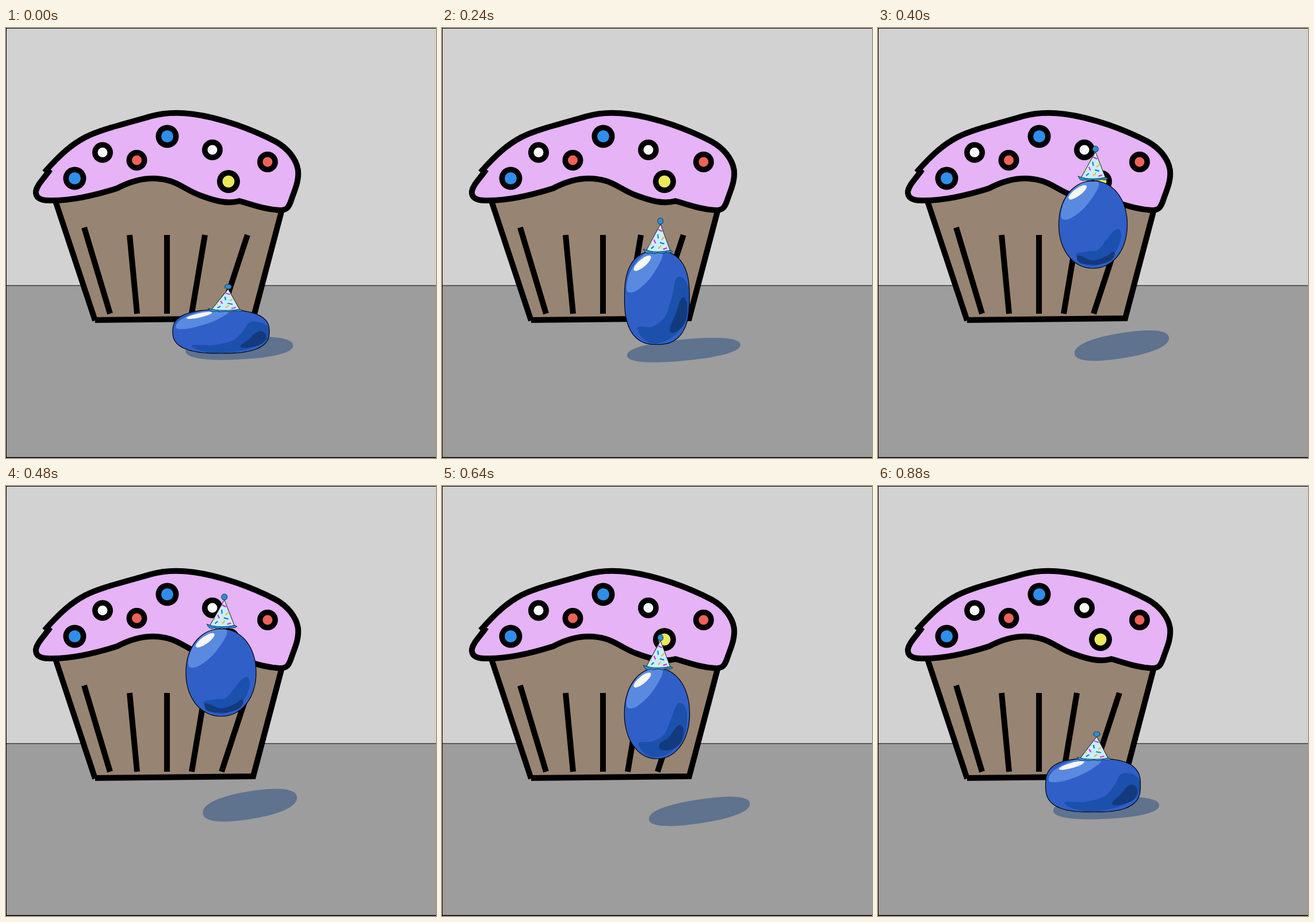
Animation of 748 by 748 pixels, one loop 960 ms. Source, as an HTML page with a canvas:

```html
<!DOCTYPE html>
<html>
<head>
<meta charset="utf-8">
<title>Bouncing blueberry</title>
<style>
  html, body { margin: 0; width: 100%; height: 100%; overflow: hidden; }
  canvas { display: block; }
</style>
</head>
<body>
<canvas id="stage" width="748" height="748"></canvas>
<script>
const ctx = document.getElementById('stage').getContext('2d');
const STEP = 80, STEPS = 12, CENTER = 374, GROUND = 567, FALL = 18;

// Key poses: size and base of the berry, squareness of its outline, hat position, shadow box
const key = (step, w, h, base, square, hatX, shX, shY, shW, shH) =>
  ({ step, w, h, base, square, hatX, shX, shY, shW, shH });
const keys = [
  key(0, 168, 76, 566, 2.6, 381.5, 406, 557, 187, 39),
  key(2, 130, 120, 567, 2.4, 378.5, 410, 564, 174, 43),
  key(4, 96, 205, 534, 2.7, 373, 431, 556.5, 220, 31),
  key(5, 119, 152, 418, 2.1, 374, 424, 552.5, 164, 44),
  key(7, 125, 152, 419, 2.1, 377, 424.5, 558, 163, 53),
  key(9, 102, 163, 566, 2.1, 374.5, 471, 574, 188, 30),
  key(11, 165, 93, 567, 2.8, 375.5, 397, 560, 184, 38)
];

const mix = (a, b, k) => a + (b - a) * k;

function poseAt(step) {
  const i = keys.findLastIndex(p => p.step <= step);
  const a = keys[i], b = keys[(i + 1) % keys.length];
  const k = (step - a.step) / ((b.step - a.step + STEPS) % STEPS), p = {};
  for (const name in a) p[name] = mix(a[name], b[name], k);
  // Free fall bends the path upwards between airborne keys
  if (a.base < 500) p.base -= FALL * 4 * k * (1 - k);
  p.lift = Math.max(0, GROUND - p.base);
  p.air = Math.min(1, (p.lift / 148) ** 2);
  return p;
}

// Superellipse whose right end rises by the given amount
function squircle(cx, cy, w, h, power, rise = 0) {
  const path = new Path2D(), bend = v => Math.sign(v) * Math.abs(v) ** (2 / power);
  for (let i = 0; i < 120; i++) {
    const a = i * Math.PI / 60, x = bend(Math.cos(a)), y = bend(Math.sin(a));
    path.lineTo(cx + x * w / 2, cy + y * h / 2 - x * rise / 2);
  }
  path.closePath();
  return path;
}

// Closed smooth curve through the points
function blob(points) {
  const n = points.length, path = new Path2D(), at = i => points[(i + n) % n];
  const tangent = i => {
    const dx = at(i + 1)[0] - at(i - 1)[0], dy = at(i + 1)[1] - at(i - 1)[1];
    const d = Math.hypot(dx, dy);
    return [dx / d, dy / d];
  };
  path.moveTo(...at(0));
  for (let i = 0; i < n; i++) {
    const [x, y] = at(i), [u, v] = at(i + 1), r = Math.hypot(u - x, v - y) / 3;
    const s = tangent(i), e = tangent(i + 1);
    path.bezierCurveTo(x + s[0] * r, y + s[1] * r, u - e[0] * r, v - e[1] * r, u, v);
  }
  return path;
}

function paint(path, fill, stroke, width) {
  if (fill) { ctx.fillStyle = fill; ctx.fill(path); }
  if (stroke) { ctx.strokeStyle = stroke; ctx.lineWidth = width; ctx.stroke(path); }
}

function disc(x, y, r) {
  const p = new Path2D();
  p.arc(x, y, r, 0, 7);
  return p;
}

const wrapper = new Path2D('M87 300L155 508L428 505L479 314L280 240Z');
const ribs = new Path2D('M86 301L155 509M155 508L432 505M429 509L480 316' +
  'M136 347L181 497M215 360L228 497M280 360V497M346 360L323 497M420 360L375 497');
const icing = new Path2D('M67 251C95 219 115 202 138 190C165 176 210 166 252 153.5' +
  'C298 140 352 152 400 168C426 177 449 187 469 197.5C490 209 505 228 508 247' +
  'C510 265 503 280 497 297C492 313 488 317 476 317C448 315 428 307 406 301' +
  'C384 307 362 300 340 292C315 283 305 272 285 266C255 257 225 262 193 279' +
  'C155 291 110 301 75 300C58 300 51 294 52 284C54 273 64 264 77 246');
const BIG = 10.5, SMALL = 8.5;
const sweets = [
  [119.5, 261.5, BIG, '#2e8fea'], [280.5, 188.5, BIG, '#2e8fea'], [387, 267, BIG, '#ece85c'],
  [168, 216.5, SMALL, '#f8f8f8'], [359, 212, SMALL, '#f8f8f8'],
  [227.5, 230, SMALL, '#ef6256'], [455, 233, SMALL, '#ef6256']
];

function drawScene() {
  ctx.fillStyle = '#d2d2d2';
  ctx.fillRect(0, 0, 748, 448);
  ctx.fillStyle = '#9d9d9d';
  ctx.fillRect(0, 448, 748, 300);
  ctx.fillStyle = '#000';
  ctx.fillRect(0, 447.5, 748, 1);
  ctx.fillRect(0, 0, 748, 1);
  ctx.fillRect(0, 0, 1, 748);
  ctx.fillRect(0, 746.5, 748, 1.5);
  paint(wrapper, '#988472');
  paint(ribs, null, '#000', 10);
  paint(icing, '#e5b3f6', '#000', 10);
  for (const [x, y, r, color] of sweets) {
    paint(disc(x, y, r + 9.5), '#000');
    paint(disc(x, y, r), color);
  }
}

const cone = new Path2D('M4.5 -46L-21.5 -2Q0 4 22.5 -2Z');
const brim = new Path2D('M-27 -4Q-20 -2 -16 -1Q0 2 24 -2L27 0Q22 4 15 1Q8 5 0 2Q-8 5 -14 2Q-20 5 -24 1Z');
const sprinkles = [
  ['#f01ae0', 'M.5 -37L7.5 -34M-7.5 -20L-4.5 -14M9.5 -4L16.5 -6'],
  ['#1779cf', 'M-.5 -29L.5 -22M3.5 -15L11.5 -13M-12.5 -5L-7.5 -9'],
  ['#f5ad3c', 'M6.5 -20L11.5 -24M.5 -5L5.5 -10M-14.5 -14L-12 -12']
].map(([color, d]) => [color, new Path2D(d)]);

// The hat gives way with the berry
function drawHat(p) {
  ctx.save();
  ctx.translate(p.hatX, p.base - p.h + 1 - 5 * p.air);
  ctx.scale(.6 + .003 * p.w, .6 + .0027 * p.h);
  paint(cone, '#c9f0fa', '#222', 1);
  for (const [color, path] of sprinkles) paint(path, null, color, 2.2);
  paint(brim, '#3190d0', '#123c5c', 1);
  paint(disc(4.5, -51, 5.2), '#2f8ccf', '#123c5c', 1);
  ctx.restore();
}

// Shading in berry units, -1 to 1; the shades slide underneath while it is airborne
const light = [[-.88, -.12], [-.9, -.4], [-.65, -.75], [-.3, -.97], [.15, -.98], [.05, -.7], [-.4, -.28]];
const shade = {
  ground: [[-.6, .68], [-.15, .62], [.25, .4], [.47, -.05], [.65, -.45], [.98, -.2], [.85, .55], [0, .98]],
  air: [[-.5, .72], [-.2, .62], [.15, .58], [.4, .34], [.73, .1], [.82, .3], [.58, .7], [0, .95]]
};
const dark = {
  ground: [[.4, .7], [.58, .35], [.8, -.02], [.93, .15], [.85, .55], [.55, .74]],
  air: [[-.47, .76], [0, .82], [.42, .71], [.62, .63], [.52, .82], [0, .92]]
};
const slide = ({ ground, air }, k) =>
  blob(ground.map(([x, y], i) => [mix(x, air[i][0], k), mix(y, air[i][1], k)]));
const gleam = new Path2D();
gleam.ellipse(-.45, -.74, .3, .09, -.5, 0, 7);

function drawBerry(p) {
  const rise = 9 + 17 * Math.min(1, p.lift / 30);
  paint(squircle(p.shX, p.shY, p.shW, p.shH, 2.3, rise), '#5f728e');

  const middle = p.base - p.h / 2;
  const body = squircle(CENTER, middle, p.w, p.h, p.square);
  paint(body, '#305fc8');
  ctx.save();
  ctx.clip(body);
  ctx.translate(CENTER, middle);
  ctx.scale(p.w / 2, p.h / 2);
  paint(blob(light), '#5a8ae0');
  paint(slide(shade, p.air), '#1b50ad');
  paint(slide(dark, p.air), '#123a7d');
  paint(gleam, '#f6f6f6');
  ctx.restore();
  paint(body, null, '#000', 1.2);
  drawHat(p);
}

const start = performance.now();
function draw(now) {
  const step = Math.floor(Math.max(0, now - start) / STEP) % STEPS;
  drawScene();
  drawBerry(poseAt(step));
  requestAnimationFrame(draw);
}
draw(start);
</script>
</body>
</html>
```
